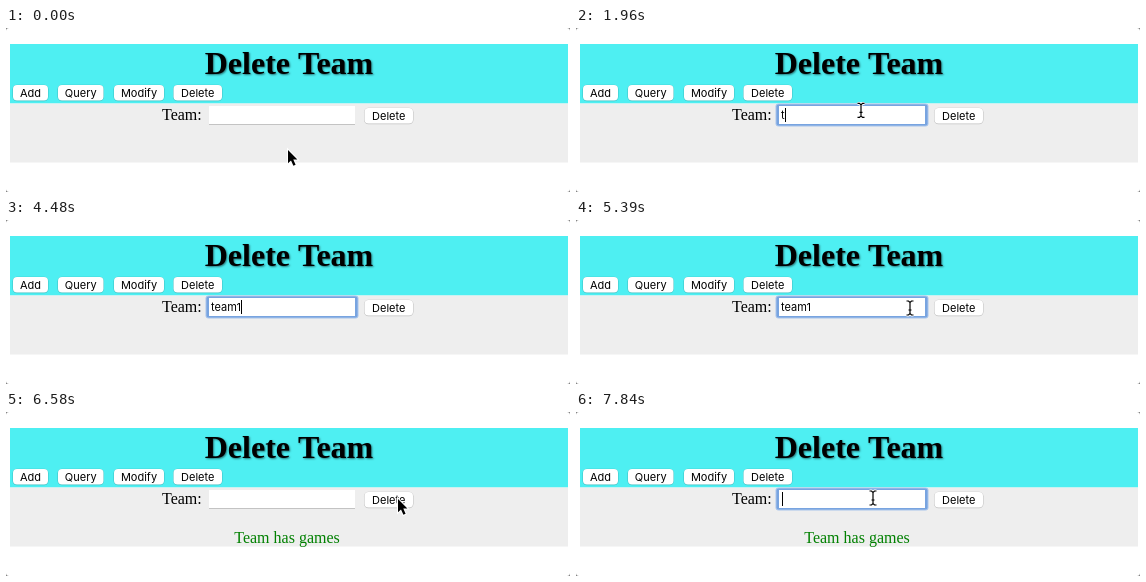
Animation of 564 by 164 pixels, one loop 8 s. Source, as an HTML page with a canvas:

```html
<!DOCTYPE html>
<html lang="en">
<head>
<meta charset="utf-8">
<title>Delete Team</title>
<style>
  html, body { margin: 0; width: 100%; height: 100%; overflow: hidden; background: #777; }
  canvas { display: block; border-radius: 3px; }
</style>
</head>
<body>
<canvas id="stage" width="564" height="164"></canvas>
<script>
const ctx = document.getElementById('stage').getContext('2d');
const LOOP = 8000, STEP = 70;
const SERIF = '"Liberation Serif", serif';
const UI = '11px Inter, sans-serif';

// Mouse position: time, x, y
const path = [
  [0, 282, 122], [70, 268, 108], [140, 222, 74], [210, 178, 44], [280, 159, 36],
  [350, 205, 64], [420, 258, 82], [490, 285, 84], [5180, 285, 79], [5250, 288, 79],
  [5320, 312, 82], [5390, 334, 88], [5460, 334, 88], [5530, 343, 82], [5600, 352, 88],
  [5740, 395, 96], [5880, 419, 97], [6020, 411, 90], [6160, 400, 87], [6300, 395, 83],
  [6440, 395, 83], [6510, 392, 87], [7000, 392, 87], [7140, 340, 89], [7280, 297, 91],
  [7420, 297, 91], [7490, 297, 86], [LOOP, 297, 86]
];
const keyTimes = [1960, 2240, 2520, 2940, 3430];
const FOCUS = 490, SUBMIT = 6510, REFOCUS = 7560;
const clicks = [770, 6440, 7770];

const between = (t, from, to) => t >= from && t < to;

function text(str, x, y, font, color = '#000', align = 'center') {
  ctx.font = font;
  ctx.fillStyle = color;
  ctx.textAlign = align;
  ctx.fillText(str, x, y);
}

function rect(color, x, y, w, h) {
  ctx.fillStyle = color;
  ctx.fillRect(x, y, w, h);
}

function rounded(color, x, y, w, h, r) {
  ctx.fillStyle = color;
  ctx.beginPath();
  ctx.roundRect(x, y, w, h, r);
  ctx.fill();
}

function button(label, x, y, w) {
  rounded('rgba(0,0,0,.2)', x - .5, y - .3, w + 1, 16.6, 4.5);
  rounded('#fff', x, y, w, 15.5, 4);
  text(label, x + w / 2, y + 12, UI);
}

function mouseAt(t) {
  const i = path.findIndex(p => p[0] > t);
  const [t0, x0, y0] = path[i - 1], [t1, x1, y1] = path[i];
  const k = (t - t0) / (t1 - t0);
  return [x0 + (x1 - x0) * k, y0 + (y1 - y0) * k];
}

function drawArrow(x, y) {
  const shape = new Path2D('M0 0V13.2L3 10.4L5.4 15.8L7.6 14.8L5.3 9.6H9.4Z');
  ctx.save();
  ctx.translate(x, y);
  ctx.lineWidth = 2;
  ctx.strokeStyle = '#fff';
  ctx.stroke(shape);
  ctx.fillStyle = '#000';
  ctx.fill(shape);
  ctx.restore();
}

function drawBeam(x, y) {
  const shape = new Path2D('M-3.5-7H-1.5L0-5.5L1.5-7H3.5M0-5.5V5.5M-3.5 7H-1.5L0 5.5L1.5 7H3.5M-1.5 2H1.5');
  ctx.save();
  ctx.translate(x, y);
  for (const [color, width] of [['#fff', 3], ['#000', 1.2]]) {
    ctx.strokeStyle = color;
    ctx.lineWidth = width;
    ctx.stroke(shape);
  }
  ctx.restore();
}

function drawField(t) {
  const focused = between(t, FOCUS, SUBMIT) || t >= REFOCUS;
  if (focused) {
    rounded('#a9c5ec', 199.5, 75.5, 153, 23, 3);
    rounded('#78a4e0', 200.5, 76.5, 151, 21, 2);
  }
  rect('#fff', 203, 78, 146, 18);
  if (!focused) return rect('#c3c3c3', 203, 96, 146, 1);

  const typed = t < SUBMIT ? 'team1'.slice(0, keyTimes.filter(k => k <= t).length) : '';
  text(typed, 205, 91, UI, '#000', 'left');
  const lastInput = Math.max(...[FOCUS, ...keyTimes, REFOCUS].filter(k => k <= t));
  if (Math.floor((t - lastInput + 70) / 560) % 2 === 0) {
    rect('#000', Math.round(205.6 + ctx.measureText(typed).width), 80, 1, 14);
  }
}

function drawMouse(t) {
  if (between(t, 2030, 5250)) return;
  const [x, y] = mouseAt(t);
  if (clicks.some(c => between(t, c, c + STEP))) {
    ctx.beginPath();
    ctx.arc(x, y, 17, 0, Math.PI * 2);
    ctx.strokeStyle = 'rgba(128,128,128,.35)';
    ctx.lineWidth = 2;
    ctx.stroke();
  }
  const overField = between(x, 203, 350) && between(y, 78, 97);
  (overField ? drawBeam : drawArrow)(x, y);
}

function draw(t) {
  rect('#fff', 0, 0, 564, 164);
  rect('#4eeff2', 4, 16, 558, 59.5);
  rect('#eee', 4, 75.5, 558, 59);

  ctx.save();
  ctx.shadowColor = 'rgba(0,0,0,.5)';
  ctx.shadowOffsetX = ctx.shadowOffsetY = 1;
  ctx.shadowBlur = 2;
  text('Delete Team', 283, 46, 'bold 32px ' + SERIF);
  ctx.restore();

  button('Add', 7, 57, 35);
  button('Query', 52, 57, 45.5);
  button('Modify', 108, 57, 50);
  button('Delete', 167.5, 57, 48.5);
  text('Team:', 156, 92, '16px ' + SERIF, '#000', 'left');
  drawField(t);
  button('Delete', 358.5, 80, 48.5);
  if (t >= SUBMIT) text('Team has games', 281, 131, '16px ' + SERIF, '#008000');
  drawMouse(t);
}

function frame() {
  const t = performance.now() % LOOP;
  draw(Math.floor(t / STEP) * STEP);
  requestAnimationFrame(frame);
}
frame();
</script>
</body>
</html>
```
